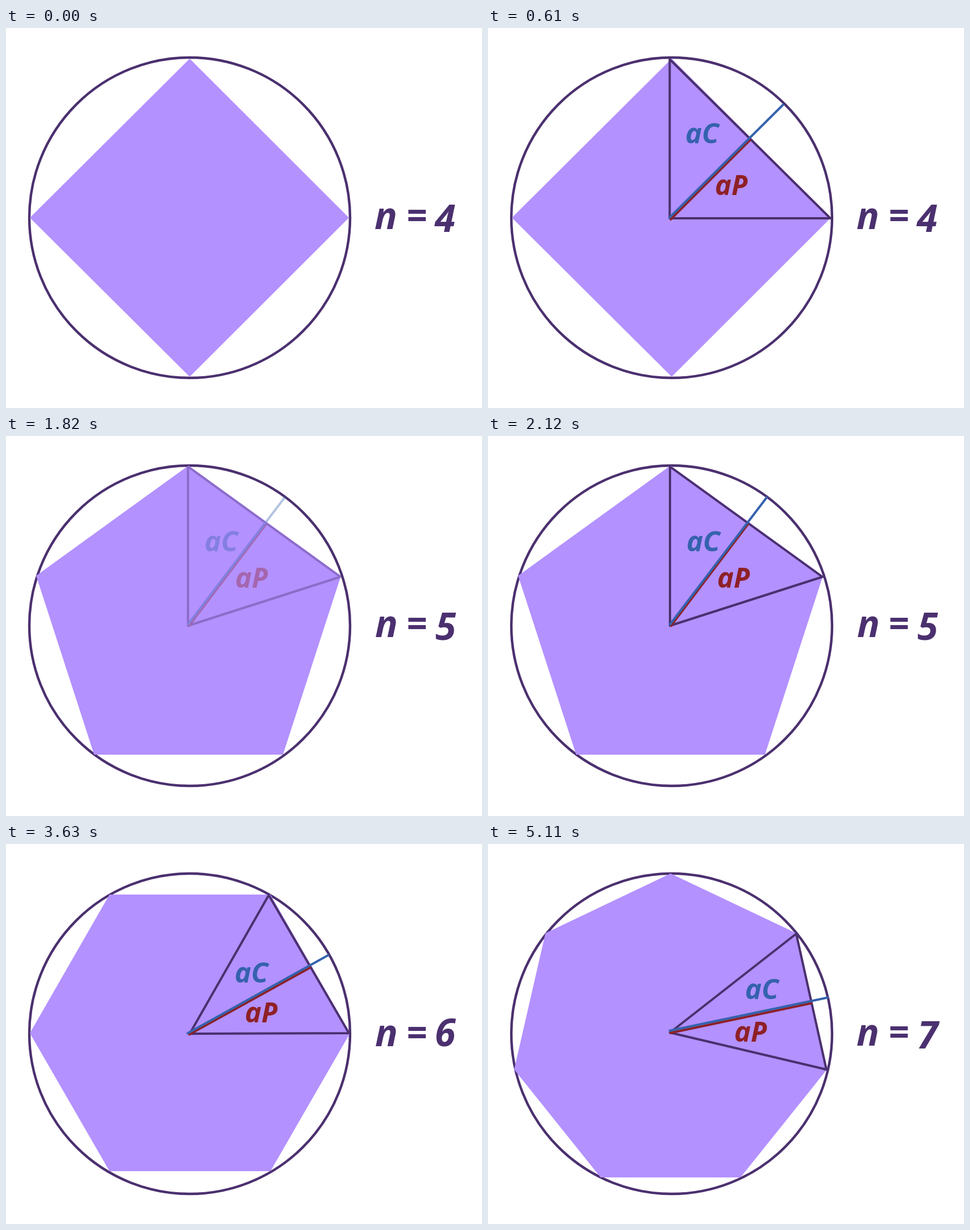
An HTML page that plays this animation: 837x669 px, repeating every 5810 ms.

```html
<!DOCTYPE html>
<html lang="en">
<head>
<meta charset="utf-8">
<title>Polygons in a circle</title>
<style>
  html, body { margin: 0; width: 100%; height: 100%; overflow: hidden; background: #fff; }
  svg { display: block; width: 837px; height: 669px; }
  text { font: italic 700 66px "Open Sans", "Noto Sans", sans-serif; fill: #4b306f; }
  .ring, .tri, .aC, .aP { fill: none; stroke: #4b306f; stroke-width: 4; stroke-linejoin: round; }
  .ring { stroke-width: 4.4; }
  .poly { fill: #b391ff; }
  .aC { stroke: #3562ad; }
  .aP { stroke: #8e2026; }
  .label text { font-size: 49px; }
  .label .c { fill: #3562ad; }
  .label .p { fill: #8e2026; }

  /* 5810 ms loop: each scene cuts in, then its triangle fades in by 30 ms steps */
  .scene { visibility: hidden; animation: 5810ms step-end infinite; }
  .label { opacity: 0; animation: 5810ms step-end infinite; }
  #s4 { animation-name: show4; }
  #s5 { animation-name: show5; }
  #s6 { animation-name: show6; }
  #s7 { animation-name: show7; }
  #s4 .label { animation-name: fade4; }
  #s5 .label { animation-name: fade5; }
  #s6 .label { animation-name: fade6; }
  #s7 .label { animation-name: fade7; }

  @keyframes show4 { 0% { visibility: visible } 25.9896%, 100% { visibility: hidden } }
  @keyframes show5 { 0% { visibility: hidden } 25.9896% { visibility: visible } 52.4956%, 100% { visibility: hidden } }
  @keyframes show6 { 0% { visibility: hidden } 52.4956% { visibility: visible } 78.4853%, 100% { visibility: hidden } }
  @keyframes show7 { 0% { visibility: hidden } 78.4853%, 100% { visibility: visible } }

  @keyframes fade4 {
    0% { opacity: 0 }
    2.7538% { opacity: 0; animation-timing-function: steps(16, start) }
    11.0154%, 100% { opacity: 1 }
  }
  @keyframes fade5 {
    0% { opacity: 0 }
    28.7435% { opacity: 0; animation-timing-function: steps(16, start) }
    37.0051%, 100% { opacity: 1 }
  }
  @keyframes fade6 {
    0% { opacity: 0 }
    55.2495% { opacity: 0; animation-timing-function: steps(15, start) }
    62.9948%, 100% { opacity: 1 }
  }
  @keyframes fade7 {
    0% { opacity: 0 }
    81.2392% { opacity: 0; animation-timing-function: steps(14, start) }
    88.4681%, 100% { opacity: 1 }
  }
</style>
</head>
<body>
<svg viewBox="0 0 837 669">
  <circle class="ring" cx="323" cy="334" r="282"/>

  <g class="scene" id="s4">
    <path class="poly" d="M323 54L603 334L323 614L42 334Z"/>
    <text y="354"><tspan x="648">n</tspan><tspan x="704">=</tspan><tspan x="754" y="359">4</tspan></text>
    <g class="label">
      <path class="tri" d="M319.5 55L602 335H319.5Z"/>
      <path class="aP" d="M320 338L462 196"/>
      <path class="aC" d="M318 335L520 134"/>
      <text class="c" x="347" y="203">aC</text>
      <text class="p" x="399" y="294">aP</text>
    </g>
  </g>

  <g class="scene" id="s5">
    <path class="poly" d="M321 52L589 246L487 561H155L53 246Z"/>
    <text y="354"><tspan x="649">n</tspan><tspan x="704">=</tspan><tspan x="755" y="359">5</tspan></text>
    <g class="label">
      <path class="tri" d="M320 54L588 248L320 334Z"/>
      <path class="aP" d="M321 335L458 154"/>
      <path class="aC" d="M319 333L491 107"/>
      <text class="c" x="349" y="203">aC</text>
      <text class="p" x="403" y="267">aP</text>
    </g>
  </g>

  <g class="scene" id="s6">
    <path class="poly" d="M182 89H465L605 333L465 576H182L42 333Z"/>
    <text y="356"><tspan x="649">n</tspan><tspan x="704">=</tspan><tspan x="754" y="356">6</tspan></text>
    <g class="label">
      <path class="tri" d="M462 90L603 333L323 334Z"/>
      <path class="aP" d="M321 336L536 217"/>
      <path class="aC" d="M318 334L568 195"/>
      <text class="c" x="402" y="244">aC</text>
      <text class="p" x="420" y="314">aP</text>
    </g>
  </g>

  <g class="scene" id="s7">
    <path class="poly" d="M321 52L542 157L596 397L444 587H198L46 397L101 157Z"/>
    <text y="355"><tspan x="648">n</tspan><tspan x="704">=</tspan><tspan x="755" y="360">7</tspan></text>
    <g class="label">
      <path class="tri" d="M542 158L595 397L320 332Z"/>
      <path class="aP" d="M319 333L570 280"/>
      <path class="aC" d="M318 329L599 270"/>
      <text class="c" x="452" y="273">aC</text>
      <text class="p" x="433" y="348">aP</text>
    </g>
  </g>
</svg>
</body>
</html>
```
